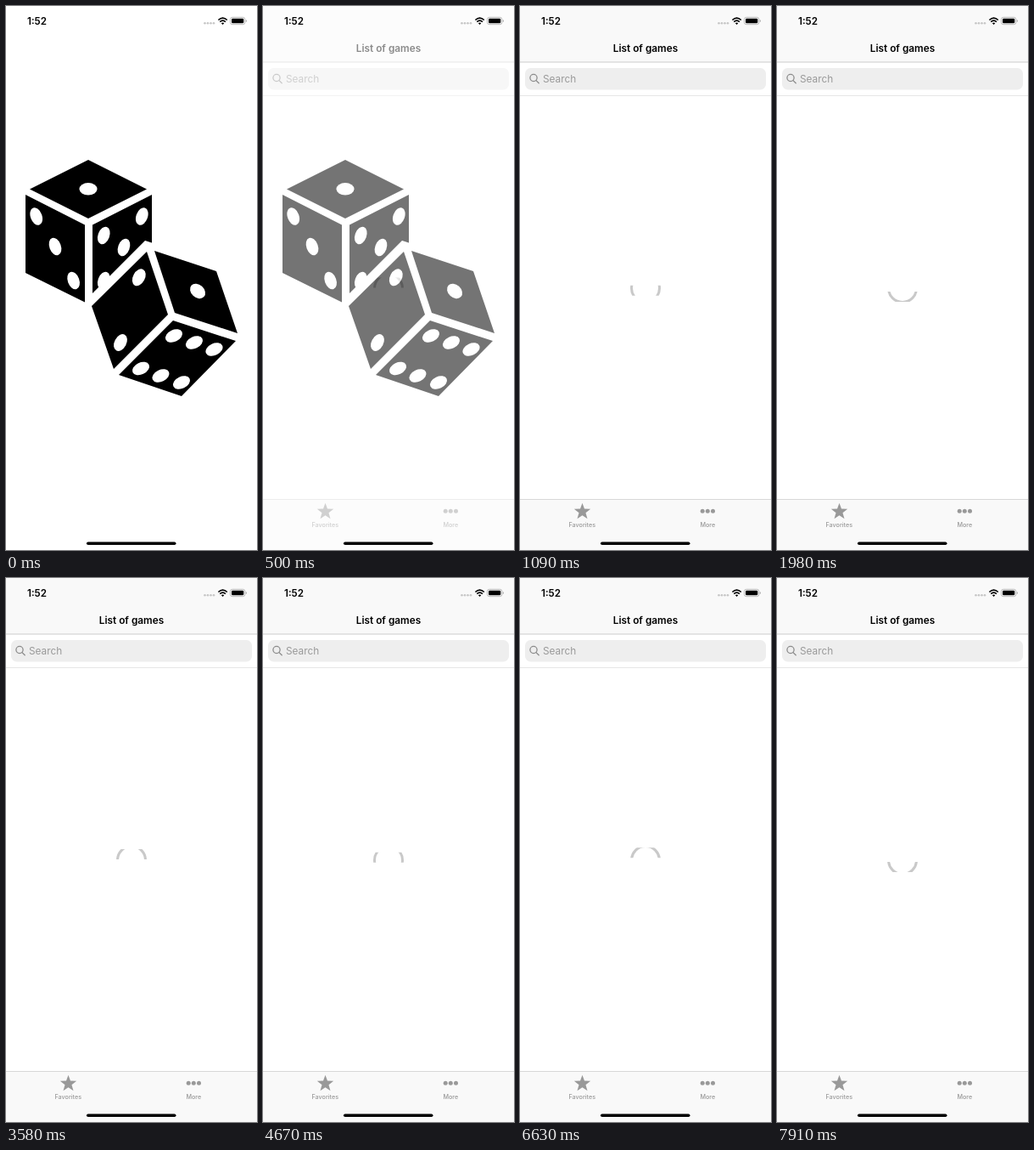
These frames come from a looping animation (296x640 px, 8 s). An HTML page:

```html
<!DOCTYPE html>
<html lang="en">
<head>
<meta charset="utf-8">
<title>List of games</title>
<style>
  html, body { margin: 0; width: 100%; height: 100%; overflow: hidden; background: #fff; }
  svg { display: block; width: 100vw; height: 100vh; }
  text { font-family: Inter, Roboto, sans-serif; }
  .bold { font-weight: 600; }
  .tab { font-size: 7.2px; font-weight: 500; fill: #999; text-anchor: middle; }
</style>
</head>
<body>
<svg viewBox="0 0 296 640">
  <defs>
    <clipPath id="band"><rect id="bandRect" x="128" y="326" width="40" height="12"/></clipPath>
  </defs>

  <g id="app">
    <rect width="296" height="640" fill="#fff"/>
    <rect width="296" height="66" fill="#f9f9f9"/>
    <rect y="65.5" width="296" height="1" fill="#ccc"/>
    <text class="bold" x="148" y="54" font-size="11.8" text-anchor="middle">List of games</text>

    <rect x="6" y="73" width="284" height="25.5" rx="6.5" fill="#eee"/>
    <rect y="105" width="296" height="1" fill="#e6e6e6"/>
    <g fill="none" stroke="#8c8c8c" stroke-width="1.3" stroke-linecap="round">
      <circle cx="16" cy="84.5" r="4.1"/>
      <path d="M19 87.6l3.2 3.2"/>
    </g>
    <text x="27" y="90" font-size="11.8" fill="#999">Search</text>

    <circle cx="148" cy="332" r="16.5" fill="none" stroke="#c9c9c9" stroke-width="3" clip-path="url(#band)"/>

    <rect y="580" width="296" height="60" fill="#f9f9f9"/>
    <rect y="580" width="296" height="1" fill="#d8d8d8"/>
    <polygon id="star" fill="#999"/>
    <g fill="#999">
      <circle cx="215.2" cy="594.3" r="2.5"/>
      <circle cx="221.3" cy="594.3" r="2.5"/>
      <circle cx="227.5" cy="594.3" r="2.5"/>
    </g>
    <text class="tab" x="73.3" y="613">Favorites</text>
    <text class="tab" x="221.3" y="613">More</text>
  </g>

  <g id="splash">
    <rect width="296" height="640" fill="#fff"/>
    <path d="M97 181l69 34.5-69 34.5-69-34.5zM23 222l70 35.500v91l-70-34.500zM102 257.500l70-35.500v91l-70 35z"/>
    <g id="pipsBack" fill="#fff"></g>
    <path fill="#fff" d="M164 276l90 29 29 86-75 78-84-32-29-92z"/>
    <path d="M166 289l25 74-64 64-26-74zM175 288l73 24 25 73-74-24zM197 370l74 24-64 65-74-25z"/>
    <g id="pipsFront" fill="#fff"></g>
  </g>

  <g id="status">
    <text class="bold" x="25" y="22" font-size="11.6">1:52</text>
    <g fill="#c6c6c6">
      <circle cx="234.500" cy="20.300" r="1.300"/>
      <circle cx="238" cy="20.300" r="1.300"/>
      <circle cx="241.500" cy="20.300" r="1.300"/>
      <circle cx="245" cy="20.300" r="1.300"/>
    </g>
    <g fill="none" stroke="#000" stroke-width="1.700">
      <path d="M250.400 16.500q5.200-4.800 10.400 0"/>
      <path d="M252.300 18.700q3.300-3 6.600 0"/>
    </g>
    <path d="M253.900 20.300q1.700-1.500 3.400 0l-1.700 1.700z"/>
    <rect x="264.500" y="13.300" width="17.300" height="8.400" rx="2.400" fill="none" stroke="#aaa" stroke-width=".8"/>
    <rect x="266" y="14.700" width="14.300" height="5.600" rx="1.200"/>
    <path d="M282.800 16v3q1.200-.5 1.200-1.500t-1.200-1.500z" fill="#aaa"/>
    <rect x="95" y="630.500" width="105.500" height="3.600" rx="1.800"/>
  </g>
</svg>
<script>
const LOOP = 8000;
const byId = id => document.getElementById(id);

function addPips(group, rx, ry, angle, ...centers) {
  for (const [x, y] of centers) {
    const pip = document.createElementNS(group.namespaceURI, 'ellipse');
    pip.setAttribute('rx', rx);
    pip.setAttribute('ry', ry);
    pip.setAttribute('transform', `translate(${x} ${y}) rotate(${angle})`);
    group.append(pip);
  }
}

const back = byId('pipsBack'), front = byId('pipsFront');
addPips(back, 10.5, 7.2, 0, [97, 215.3]);
addPips(back, 6.8, 10.6, -20, [35.7, 247.5], [58, 283], [79.6, 323]);
addPips(back, 6.8, 10.6, 20, [160.3, 247.5], [115.3, 270], [139, 284], [115.3, 323]);
addPips(front, 7, 10.6, 28, [156.8, 319.3], [135, 396]);
addPips(front, 10, 7.6, 42, [226, 335.4]);
addPips(front, 10.6, 7, -25, [198, 388], [222, 396], [245.5, 404], [159, 426.5], [182.5, 435], [207, 443]);

byId('star').setAttribute('points', Array.from({ length: 10 }, (_, i) => {
  const r = i % 2 ? 4.2 : 10.2, a = i * Math.PI / 5;
  return [73.5 + r * Math.sin(a), 595 - r * Math.cos(a)].map(v => v.toFixed(2));
}).join(' '));

// Runs of evenly spaced redraws: first time, last time, count
const runs = [
  [500, 1300, 8], [1420, 2200, 8], [2310, 3060, 8], [3160, 3890, 8], [4010, 4770, 8],
  [4870, 5640, 8], [5750, 6530, 8], [6630, 7400, 8], [7500, 7910, 5]
];
const ticks = [0, ...runs.flatMap(([from, to, n]) =>
  Array.from({ length: n }, (_, i) => from + i * (to - from) / (n - 1)))];

function draw(time) {
  const t = ticks.findLast(tick => tick <= time + 0.01);
  const phase = (t - 7910) / 1028 * 2 * Math.PI + 0.73;
  byId('bandRect').setAttribute('y', 326 + 12 * Math.sin(phase));
  byId('splash').setAttribute('opacity', Math.max(0, Math.min(1, (635 - t) / 250)));
}

const start = performance.now();
function loop() {
  draw((performance.now() - start) % LOOP);
  requestAnimationFrame(loop);
}
loop();
</script>
</body>
</html>
```
